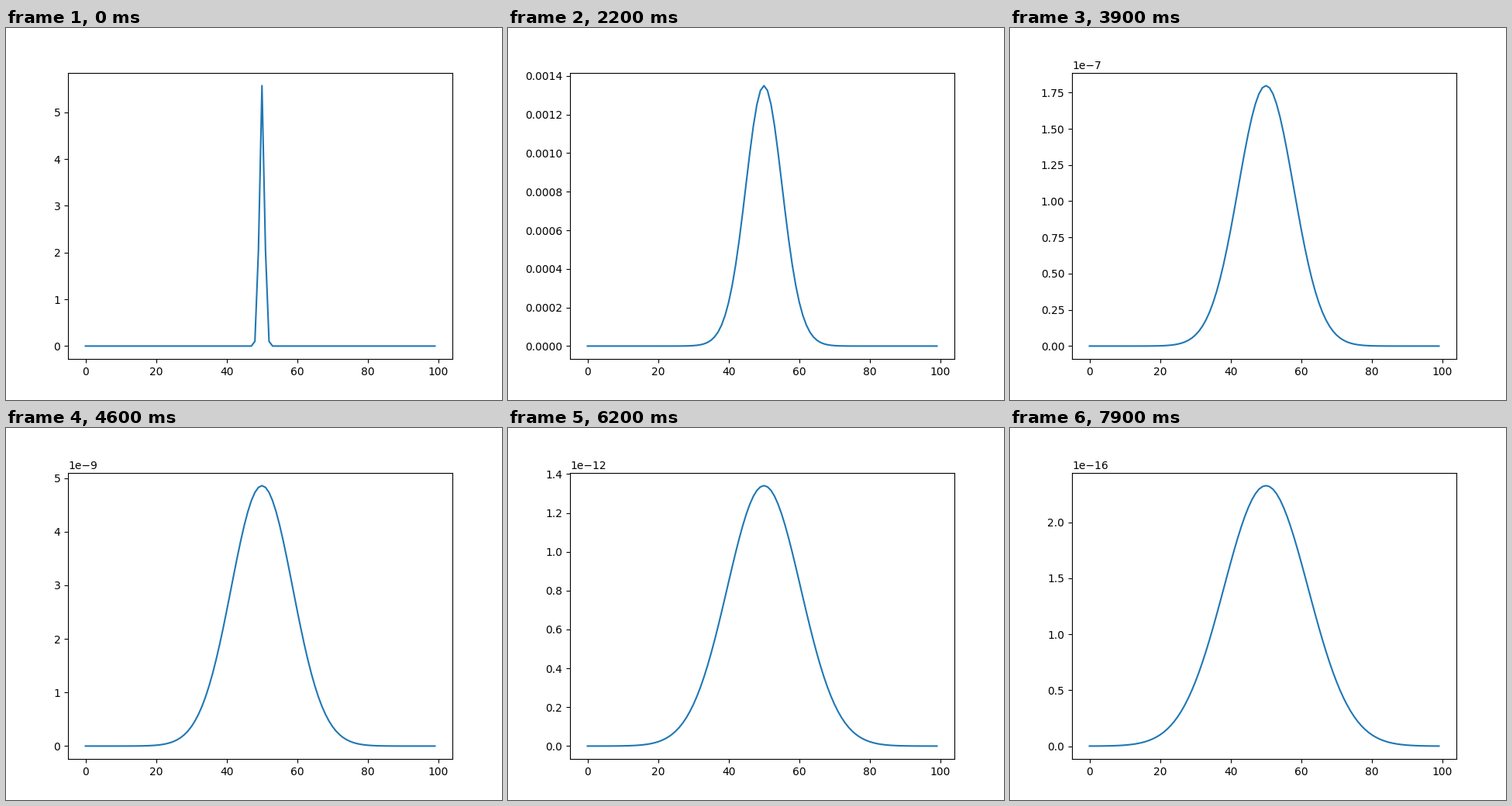
Animation of 640x480 px, one loop 8000 ms. Source, as a matplotlib script:

```python
import numpy as np
import matplotlib.pyplot as plt
from matplotlib.animation import FuncAnimation

FRAMES = 80
INTERVAL = 100      # ms per frame
DT = 0.01
STEPS = 100         # Euler steps per frame
DECAY = 0.5
HEIGHT = 5.57

x = np.arange(100)


def step(u):
    """One Euler step of diffusion, decay and saturating self-activation."""
    spread = np.roll(u, 1) + np.roll(u, -1) - 2 * u
    return u + DT * (spread - DECAY * u + u**2 / (1 + u**2))


def solve():
    u = HEIGHT * np.exp(-(x - 50.0) ** 2)
    states = [u]
    for _ in range(FRAMES - 1):
        for _ in range(STEPS):
            u = step(u)
        states.append(u)
    return states


states = solve()
fig, ax = plt.subplots(figsize=(6.4, 4.8), dpi=100)


def draw(i):
    ax.clear()
    return ax.plot(x, states[i], color="C0", lw=1.5)


anim = FuncAnimation(fig, draw, frames=FRAMES, init_func=lambda: draw(0),
                     interval=INTERVAL, repeat=True)
plt.show()
```
